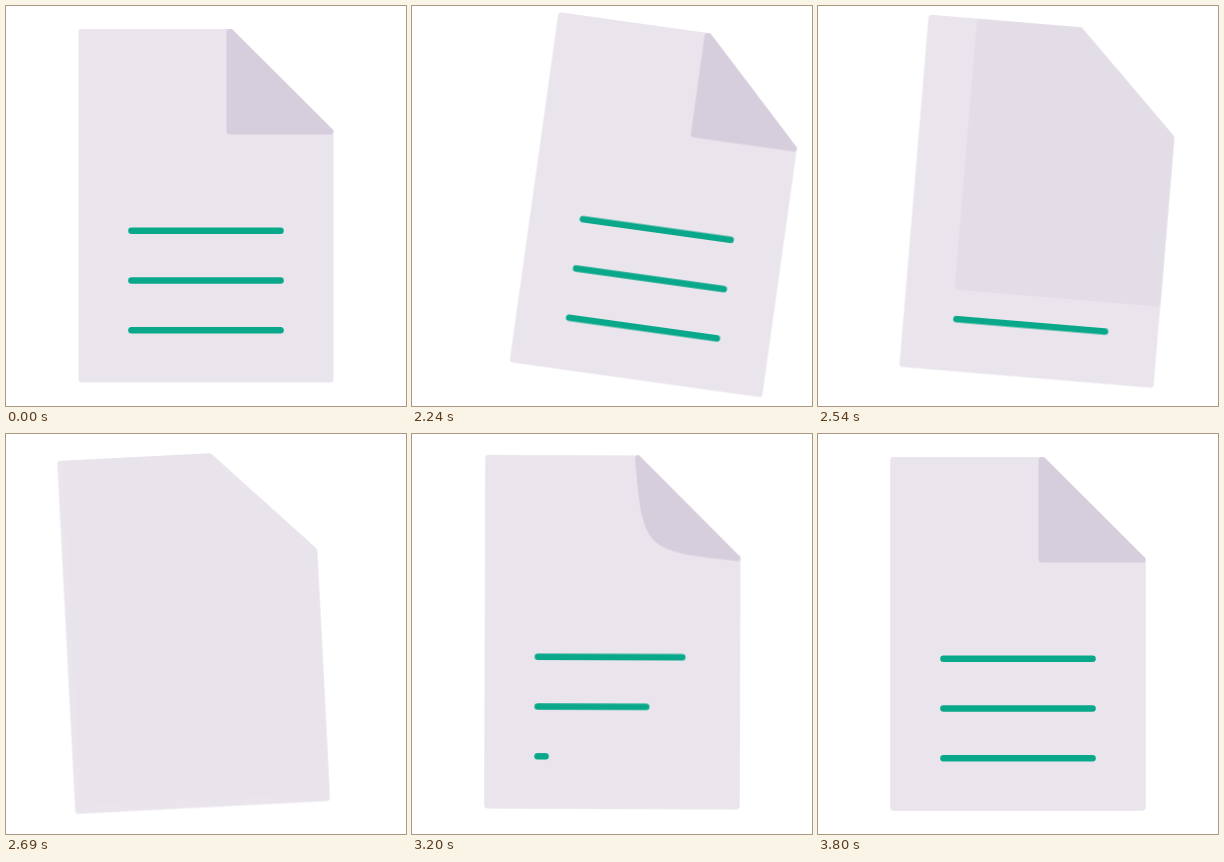
Recreate the animation shown at these times as an HTML page without scripts. Size 400 by 400 pixels, loop 3830 ms.

```html
<!DOCTYPE html>
<html lang="en">
<head>
<meta charset="utf-8">
<title>Page turn</title>
<style>
  :root {
    --page: #eae5ec;
    --fold: #d6cedd;
    --ink: #0aa88a;
    --sine: cubic-bezier(.37, 0, .63, 1);
  }
  html, body { margin: 0; width: 100%; height: 100%; overflow: hidden; background: #fff; }
  svg { display: block; width: 100%; height: 100%; }

  .sway, .lift, .tilt, .turn, .curl, .write { animation: 3830ms linear infinite both; }
  .sway { animation-name: sway; animation-timing-function: var(--sine); }
  .lift { animation-name: lift; animation-timing-function: var(--sine); }
  .tilt { animation-name: tilt; animation-timing-function: var(--sine); transform-origin: 200px 200px; }
  .turn { animation-name: turn; }
  .curl { animation-name: curl; }
  .write { animation-name: write; stroke-dasharray: 149 200; }
  .write:nth-child(2) { animation-delay: 200ms; }
  .write:nth-child(3) { animation-delay: 400ms; }

  .paper { stroke-width: 6; stroke-linejoin: round; }
  .sheet { fill: var(--page); stroke: var(--page); }
  .fold { fill: var(--fold); stroke: var(--fold); }
  .lines { fill: none; stroke: var(--ink); stroke-width: 6.6; stroke-linecap: round; }

  @keyframes sway {
    0%, 52.35% { transform: translateX(0); }
    60.18% { transform: translateX(54px); }
    75.72% { transform: translateX(-37.3px); }
    88.25% { transform: translateX(17px); }
    99.22%, 100% { transform: translateX(0); }
  }
  @keyframes lift {
    0%, 52.35% { transform: translateY(0); }
    60.18% { transform: translateY(-1.1px); }
    67.1% { transform: translateY(-4.6px); }
    76.5%, 80.16% { transform: translateY(2.6px); }
    88.25% { transform: translateY(-8.8px); }
    99.22%, 100% { transform: translateY(0); }
  }
  @keyframes tilt {
    0%, 52.35% { transform: rotate(0deg); }
    60.18% { transform: rotate(8.9deg); animation-timing-function: cubic-bezier(.54, 0, .46, 1); }
    76.5% { transform: rotate(-7.2deg); }
    88.25% { transform: rotate(4deg); }
    99.22%, 100% { transform: rotate(0deg); }
  }
  /* the folded corner grows over the whole sheet */
  @keyframes turn {
    0%, 62.14% {
      d: path("M223.5 26L224.8 26L324.5 125.7L324.5 125.5L223.5 125.5Z");
      fill: var(--fold); stroke: var(--fold);
      animation-timing-function: var(--sine);
    }
    72.85%, 100% {
      d: path("M75.5 26L224.8 26L324.5 125.7L324.5 373.5L75.5 373.5Z");
      fill: var(--page); stroke: var(--page);
    }
  }
  /* a new corner curls in */
  @keyframes curl {
    0%, 75.32% { opacity: 0; stroke-width: 0; }
    75.33% { opacity: 1; stroke-width: 0; }
    76.11% { stroke-width: 6; }
    0%, 76.11% {
      d: path("M224.8 26C242 43.2 262 63.2 274.7 75.9C287 88.2 307 108.2 324.5 125.7L324.5 125.7L224.8 26Z");
    }
    83.55% {
      d: path("M225 26.5C229 71 231 93.5 243.4 106C256 118.3 279 120.6 324.5 125.2L324.5 125.7L224.8 26Z");
      animation-timing-function: cubic-bezier(.2, .6, .4, 1);
    }
    93.99%, 100% {
      d: path("M223.5 26C223.5 70 223.5 95 223.5 125.5C250 125.5 285 125.5 324.5 125.5L324.5 125.7L224.8 26Z");
    }
    76.11%, 100% { opacity: 1; stroke-width: 6; }
  }
  @keyframes write {
    0%, 72.84% { opacity: 0; stroke-dashoffset: 149; }
    72.85% { opacity: 1; stroke-dashoffset: 149; animation-timing-function: cubic-bezier(.333, 1, .667, 1); }
    88.51%, 100% { opacity: 1; stroke-dashoffset: 0; }
  }
</style>
</head>
<body>
<svg viewBox="0 0 400 400">
  <g class="sway"><g class="lift"><g class="tilt">
    <path class="paper sheet" d="M75.5 26L224.8 26L324.5 125.7L324.5 373.5L75.5 373.5Z"/>
    <g class="lines">
      <path d="M125.5 224.8H274.5"/>
      <path d="M125.5 274.5H274.5"/>
      <path d="M125.5 324.2H274.5"/>
    </g>
    <path class="paper fold turn" d="M223.5 26L224.8 26L324.5 125.7L324.5 125.5L223.5 125.5Z"/>
    <path class="paper fold curl" d="M224.8 26C242 43.2 262 63.2 274.7 75.9C287 88.2 307 108.2 324.5 125.7L324.5 125.7L224.8 26Z"/>
    <g class="lines">
      <path class="write" d="M125.5 224.8H274.5"/>
      <path class="write" d="M125.5 274.5H274.5"/>
      <path class="write" d="M125.5 324.2H274.5"/>
    </g>
  </g></g></g>
</svg>
</body>
</html>
```
